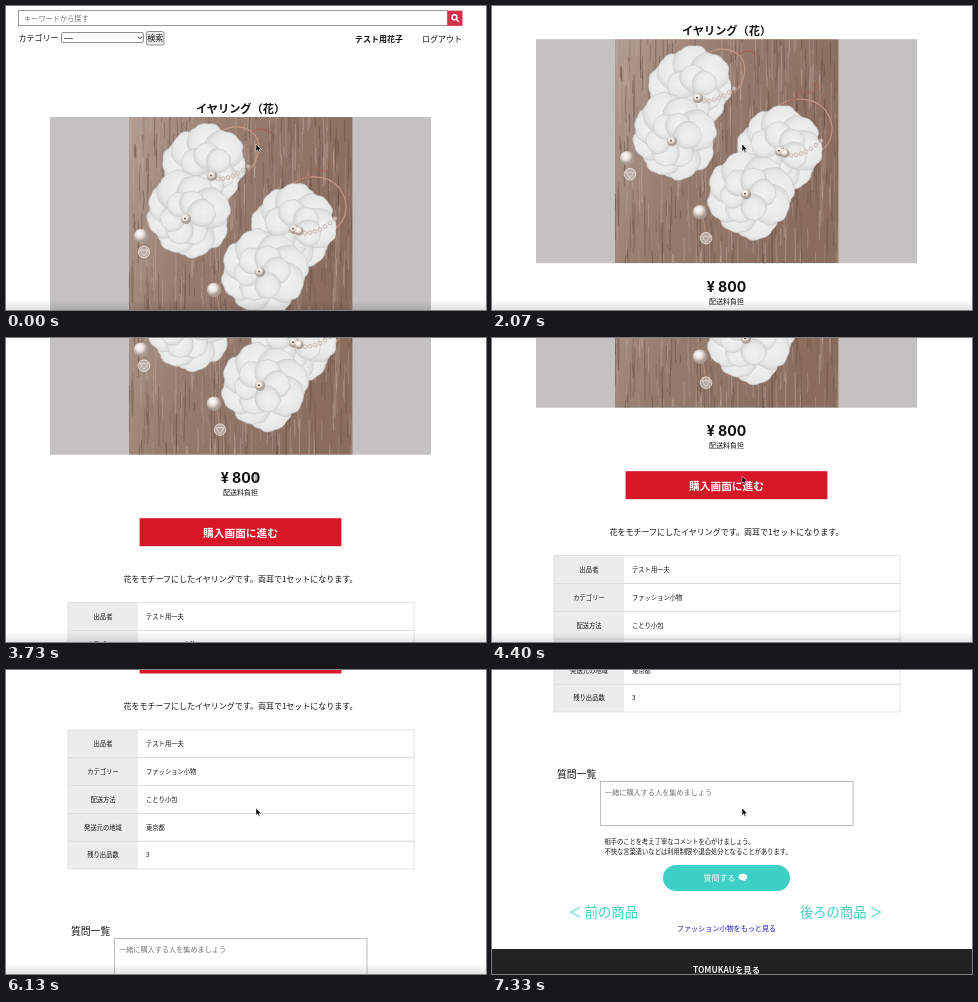
An HTML page for the animation above (7.39 s loop, 480 by 304 pixels).

```html
<!DOCTYPE html>
<html lang="ja">
<head>
<meta charset="utf-8">
<style>
html, body { margin: 0; width: 100%; height: 100%; overflow: hidden; background: #fff; }
svg { display: block; width: 480px; height: 304px; }
text { font-family: "Noto Sans CJK JP", "Noto Sans CJK", sans-serif; white-space: pre; }
</style>
</head>
<body>
<svg viewBox="0 0 480 304">
  <defs>
    <linearGradient id="wood" x1="0" y1="0" x2="1" y2="0.35">
      <stop offset="0" stop-color="#b09c93"/><stop offset="0.45" stop-color="#957b6e"/><stop offset="1" stop-color="#8a6d5f"/>
    </linearGradient>
    <radialGradient id="petal" cx="0.6">
      <stop offset="0" stop-color="#f0f1f1"/><stop offset="0.7" stop-color="#e8e9e9"/><stop offset="1" stop-color="#d9d9d9"/>
    </radialGradient>
    <radialGradient id="pearl" cx="0.4" cy="0.35">
      <stop offset="0" stop-color="#fff"/><stop offset="0.5" stop-color="#ece4df"/><stop offset="1" stop-color="#a99a92"/>
    </radialGradient>
    <linearGradient id="shade" x1="0" y1="0" x2="0" y2="1">
      <stop offset="0" stop-opacity="0"/><stop offset="1" stop-opacity="0.11"/>
    </linearGradient>
    <clipPath id="frame"><rect x="123" y="111" width="223.4" height="224"/></clipPath>
  </defs>
  <g id="page">
    <g id="photo" clip-path="url(#frame)"></g>
  </g>
  <rect y="294" width="480" height="10" fill="url(#shade)"/>
  <path id="arrow" d="M250 138v7.4l1.7-1.6 1.1 2.6 1.2-.5-1.1-2.5h2.3z" stroke="#fff" stroke-width=".5"/>
  <path id="beam" d="M248.6 135.5q1.4 0 1.4 1v6q0 1-1.4 1m2.8-8q-1.4 0-1.4 1m0 6q0 1 1.4 1" fill="none" stroke="#444" stroke-width=".8"/>
</svg>
<script>
const $ = id => document.getElementById(id);
const page = $('page'), photo = $('photo');

function add(parent, tag, attrs, content) {
  const el = document.createElementNS('http://www.w3.org/2000/svg', tag);
  for (const k in attrs) el.setAttribute(k, attrs[k]);
  if (content) el.textContent = content;
  parent.append(el);
  return el;
}
const rect = (x, y, width, height, fill, more) =>
  add(page, 'rect', { x, y, width, height, fill, ...more });
// y is the middle of the line
const text = (str, x, y, size, more) =>
  add(page, 'text', { x, y: y + size * 0.38, 'font-size': size, fill: '#111', ...more }, str);
const mid = (str, y, size, more) => text(str, 234.5, y, size, { 'text-anchor': 'middle', ...more });
const line = (parent, d, stroke, width, more) =>
  add(parent, 'path', { d, stroke, 'stroke-width': width, fill: 'none', ...more });
const bold = { 'font-weight': 700 }, medium = { 'font-weight': 500 };

// header
rect(12.5, 4.5, 429, 15, '#fff', { stroke: '#999', 'stroke-width': 1 });
text('キーワードから探す', 18, 12.3, 7.2, { fill: '#757575' });
rect(441.5, 4.6, 15, 15.3, '#d5304c');
line(page, 'M450.2 13.2l2.6 2.6M450.9 11.2a2.5 2.5 0 1 1-5 0a2.5 2.5 0 1 1 5 0', '#fff', 1.4);
text('カテゴリー', 12.5, 32, 8);
rect(55.5, 26.5, 82, 10, '#fff', { rx: 1.5, stroke: '#777', 'stroke-width': 0.8 });
text('---', 58, 31.6, 8, bold);
line(page, 'M131.8 30.6l2.1 2.2 2.1-2.2', '#222', 1);
rect(140.5, 25.5, 17.5, 13.5, '#efefef', { rx: 1.5, stroke: '#777', 'stroke-width': 0.8 });
text('検索', 141.3, 32, 8, medium);
text('テスト用花子', 349, 33, 8, bold);
text('ログアウト', 416, 33, 8);

// product
mid('イヤリング（花）', 102.5, 11.2, bold);
rect(44, 111, 381, 224, '#c3c1c2');
page.append(photo);
drawPhoto();
mid('¥ 800', 358, 14.1, { ...bold, style: 'font-family: Inter, "Liberation Sans", sans-serif' });
mid('配送料負担', 372.8, 7, medium);
rect(133.6, 398.5, 201.8, 28, '#d71628');
mid('購入画面に進む', 412.8, 10.7, { ...bold, fill: '#fff' });
mid('花をモチーフにしたイヤリングです。両耳で1セットになります。', 459, 8);

// details
const rows = [['出品者', 'テスト用一夫'], ['カテゴリー', 'ファッション小物'], ['配送方法', 'ことり小包'],
  ['発送元の地域', '東京都'], ['残り出品数', '3']];
rect(62, 483, 70, 139, '#ececec');
rows.forEach(([label, value], i) => {
  const y = 483 + i * 27.8;
  rect(62, y, 346, 27.8, 'none', { stroke: '#dcdcdc', 'stroke-width': 0.8 });
  text(label, 97, y + 13.9, 6.3, { ...medium, 'text-anchor': 'middle' });
  text(value, 140, y + 13.9, 6.3, medium);
});

// questions
text('質問一覧', 65, 684, 9.8, medium);
rect(108.5, 691.5, 252.5, 44, '#fff', { stroke: '#b5b5b5', 'stroke-width': 0.9 });
text('一緒に購入する人を集めましょう', 113, 701.8, 7.15, { fill: '#757575' });
text('相手のことを考え丁寧なコメントを心がけましょう。', 112.5, 751.5, 6.27, medium);
text('不快な言葉遣いなどは利用制限や退会処分となることがあります。', 112.5, 761.3, 6.27, medium);
rect(171, 775, 127, 26, '#3ecfc5', { rx: 13 });
text('質問する', 211.5, 788.3, 8, { fill: '#fff' });
add(page, 'path', { d: 'M246.5 787a4.4 3.2 0 1 1 6.5 2.8l1.4 1.5-3.5-1a4.4 3.2 0 0 1-4.4-3.3', fill: '#fff' });
text('＜ 前の商品', 76.5, 822, 13.3, { fill: '#3ecfc5' });
text('後ろの商品 ＞', 308, 822, 13.3, { fill: '#3ecfc5' });
mid('ファッション小物をもっと見る', 838, 7.1, { fill: '#1c14bd' });
rect(0, 859, 480, 60, '#222');
mid('TOMUKAUを見る', 880, 8.4, { ...bold, fill: '#fff' });

function drawPhoto() {
  const rnd = i => Math.abs(Math.sin(i * 127.1 + 3) * 43758.5) % 1;
  const circle = (cx, cy, r, fill, more) => add(photo, 'circle', { cx, cy, r, fill, ...more });
  add(photo, 'rect', { x: 123, y: 111, width: 224, height: 224, fill: 'url(#wood)' });
  for (let i = 0; i < 500; i++) {
    const x = 123 + rnd(i) * 224, y = 95 + rnd(i + 1000) * 235, len = 8 + rnd(i + 2000) * 40;
    line(photo, `M${x} ${y}q${rnd(i + 3000) * 3 - 1.5} ${len / 2} 0 ${len}`,
      i % 2 ? '#5f483d' : '#c3aea4', 0.5 + rnd(i + 4000) * 0.8, { opacity: 0.45 });
  }
  const gold = '#c99a85';
  line(photo, 'M208 138C208 122 232 116 246 126C256 134 255 152 242 165', gold, 1.1);
  line(photo, 'M246 126q6-4 11-3t9 5', '#b5564d', 1);
  line(photo, 'M278 188C292 166 322 166 334 183C344 197 341 213 330 222', gold, 1.1);
  line(photo, 'M278 186q14-13 26-15q1-8 6-9q10 9 17-5q-3-4-7 0', '#a5624f', 1);
  line(photo, 'M150 206L136 224v22M226 264L210 282l4 26', gold, 0.8);

  // one ruffled petal pointing right, of length 1
  const petal = 'M0 0C.1-.3 .35-.52 .62-.46Q.8-.46 .86-.3Q1-.2 .98 0Q1.03 .2 .88 .28Q.82 .46 .62 .44C.35 .5 .1 .3 0 0Z';
  // middle x, y, radius, then the heart of the flower
  [[199, 159, 43, 206, 170], [181, 208, 43, 180, 213], [288, 220, 44, 288, 223], [257, 266, 44, 254, 266]]
    .forEach(([x, y, r, hx, hy], n) => {
      const ring = (cx, cy, count, size, turn) => {
        for (let i = 0; i < count; i++) {
          const a = turn + (i + rnd(n * 30 + i) * 0.3) * 360 / count;
          const s = size * (0.92 + rnd(n * 20 + i) * 0.16);
          add(photo, 'path', { d: petal, fill: 'url(#petal)', stroke: '#c4c3c2', 'stroke-width': 0.5 / s,
            transform: `translate(${cx} ${cy}) rotate(${a}) scale(${s})` });
        }
      };
      ring(x, y, 8, r, n * 23);
      ring((x + hx) / 2, (y + hy) / 2, 6, r * 0.65, n * 31 + 15);
      circle(hx, hy, 5, 'url(#pearl)');
      circle(hx - 1, hy - 0.5, 1, '#6d5140');
    });
  for (let i = 0; i < 7; i++) {
    const bead = { stroke: '#b8a59c', 'stroke-width': 0.6, 'fill-opacity': 0.6 };
    circle(212 + i * 5, 173 - i * i * 0.35, 2, '#e6dbd5', bead);
    circle(299 + i * 5, 227 - i * i * 0.4, 2, '#e6dbd5', bead);
  }
  circle(293, 225, 4.5, 'url(#pearl)');
  [[135, 230, 138, 246], [208, 284, 214, 310]].forEach(([x, y, cx, cy]) => {
    circle(x, y, 7.2, 'url(#pearl)');
    circle(cx, cy, 5.8, '#c9bdb6', { stroke: '#eee8e4', 'stroke-width': 0.8, 'fill-opacity': 0.7 });
    line(photo, `M${cx - 4} ${cy - 2}l4 6 4-6z`, '#f3efec', 0.6);
  });
}

// time in ms, scroll in px, speed in px/s
const keys = [[0, 0, 0], [1133, 0, 0], [2070, 78, 50], [2800, 120, 55], [3730, 218, 88], [4470, 266, 0],
  [4600, 266, 0], [5200, 332, 165], [5400, 366, 95], [5600, 373, 0], [5733, 373, 0], [6130, 423, 0],
  [6267, 423, 0], [7000, 552, 125], [7330, 580, 0], [7390, 580, 0]];

function scrollAt(t) {
  const i = Math.max(1, keys.findIndex(k => k[0] >= t));
  const [t0, y0, v0] = keys[i - 1], [t1, y1, v1] = keys[i];
  const d = t1 - t0, u = (t - t0) / d, w = 1 - u;
  return y0 * w * w * (1 + 2 * u) + y1 * u * u * (3 - 2 * u)
    + d / 1000 * u * w * (v0 * w - v1 * u);
}

const LOOP = 7390, STEP = 1000 / 15;
function draw() {
  const now = performance.now() % LOOP;
  const y = scrollAt(Math.floor((now + 4) / STEP) * STEP);
  page.setAttribute('transform', `translate(0 ${-y})`);
  const onText = (y > 210 && y < 228) || (y > 314 && y < 345);
  $('beam').style.display = onText ? '' : 'none';
  $('arrow').style.display = onText ? 'none' : '';
  requestAnimationFrame(draw);
}
draw();
</script>
</body>
</html>
```
